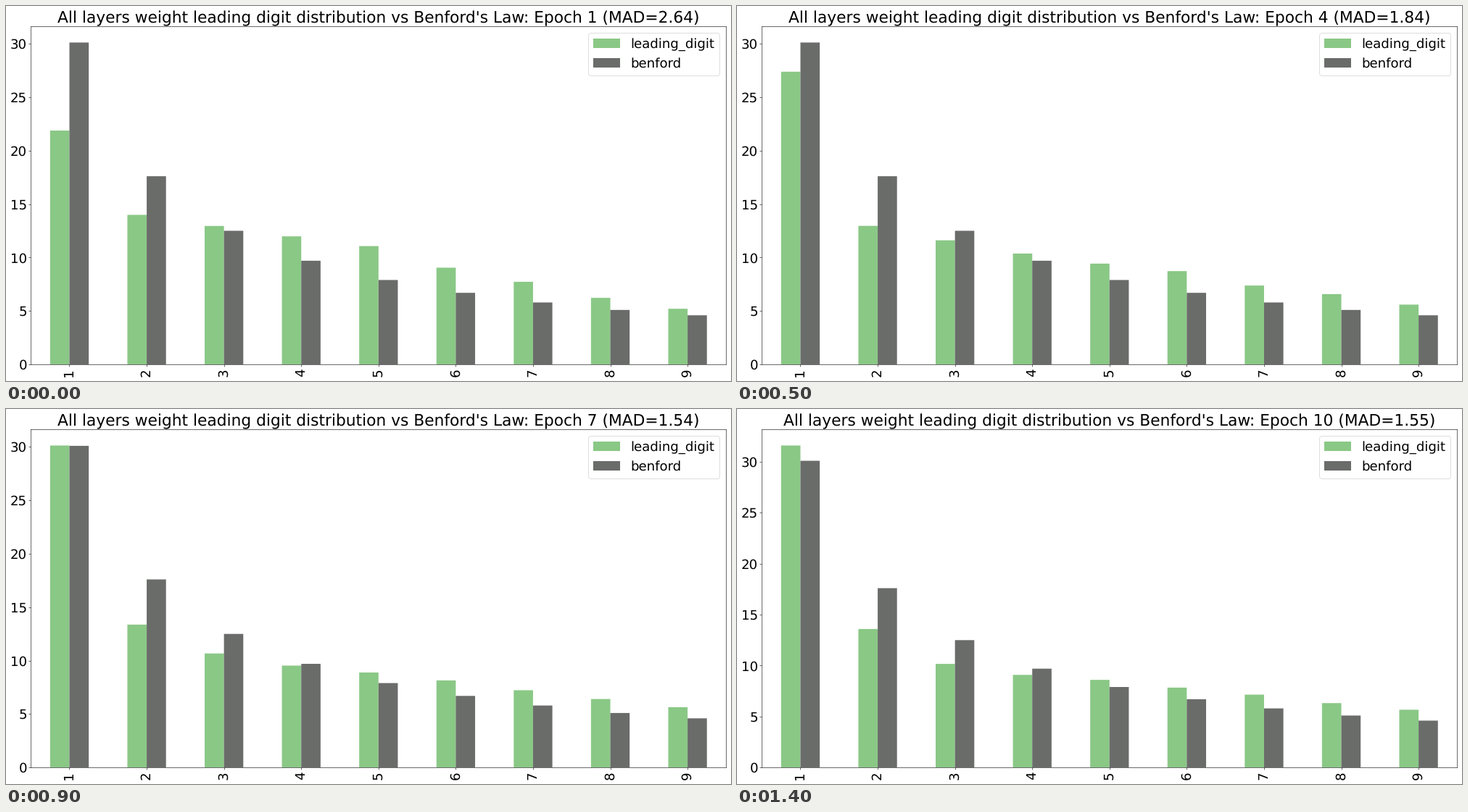
A matplotlib script for the animation above (2 s loop, 1000 px wide and 518 px high).

```python
import numpy as np
import matplotlib.pyplot as plt
from matplotlib.animation import FuncAnimation

W, H, DPI = 1000, 518, 64
LEFT, RIGHT, TOP, BOTTOM = 34.2, 993.4, 28.2, 495.2
GREEN, GRAY = "#8ac886", "#6a6c6a"
BAR = 0.25
EPOCHS = 10


def pt(px):
    return px * 72 / DPI


TEXT, TITLE = pt(18.08), pt(21.7)
LINE, TICK = pt(0.58), pt(2.53)

plt.rcParams.update({
    "font.family": "DejaVu Sans",
    "font.size": TEXT,
    "text.hinting": "none",
    "text.hinting_factor": 8,
    "axes.linewidth": LINE,
    "patch.linewidth": pt(0.8),
})

digits = np.arange(1, 10)
benford = np.round(100 * np.log10(1 + 1 / digits), 1)

# Leading digit shares (%) early, midway and at the end of training
first = [21.87, 13.99, 12.95, 11.98, 11.07, 9.05, 7.73, 6.23, 5.21]
middle = [27.37, 12.96, 11.61, 10.37, 9.43, 8.73, 7.38, 6.58, 5.60]
last = [31.60, 13.59, 10.17, 9.09, 8.60, 7.84, 7.15, 6.32, 5.67]
MIDDLE_EPOCH = 4


def ease(epoch):
    """Learning progress: fast at first, then levelling off."""
    return (1 - np.exp(-0.21 * (epoch - 1))) / (1 - np.exp(-0.21 * (EPOCHS - 1)))


def shares(epoch):
    keys = [0, ease(MIDDLE_EPOCH), 1]
    return np.array([np.interp(ease(epoch), keys, path)
                     for path in zip(first, middle, last)])


def deviation(epoch):
    return np.interp(epoch, [1, 2, 4, 6, 8, 10],
                     [2.64, 2.19, 1.84, 1.56, 1.53, 1.55])


def epoch_at(step):
    starts = np.round(1.57 * np.arange(EPOCHS))
    return int(np.sum(starts <= step))


fig = plt.figure(figsize=(W / DPI, H / DPI), dpi=DPI, facecolor="white")
ax = fig.add_axes([LEFT / W, 1 - BOTTOM / H,
                   (RIGHT - LEFT) / W, (BOTTOM - TOP) / H])


def draw_bars(side, heights, color, label):
    return ax.bar(digits + side * BAR / 2, heights, BAR, color=color,
                  label=label, linewidth=0, snap=False)


green_bars = draw_bars(-1, first, GREEN, "leading_digit")
draw_bars(1, benford, GRAY, "benford")

ax.set_xlim(0.5, 9.5)
ax.set_xticks(digits)
ax.set_yticks(range(0, 31, 5))
ax.tick_params(width=LINE, length=TICK, pad=TICK, labelsize=TEXT)
ax.tick_params(axis="x", labelrotation=90)
ax.legend(loc="upper right", fontsize=TEXT)
title = ax.set_title("", fontsize=TITLE, pad=pt(4.34))


def update(step):
    epoch = epoch_at(step)
    heights = shares(epoch)
    for bar, height in zip(green_bars, heights):
        bar.set_height(height)
    ax.set_ylim(0, 1.05 * max(heights.max(), benford.max()))
    title.set_text("All layers weight leading digit distribution vs Benford's "
                   f"Law: Epoch {epoch} (MAD={deviation(epoch):.2f})")
    return [*green_bars, title]


anim = FuncAnimation(fig, update, frames=20, interval=100,
                     repeat=True, repeat_delay=0, blit=False)
plt.show()
```
